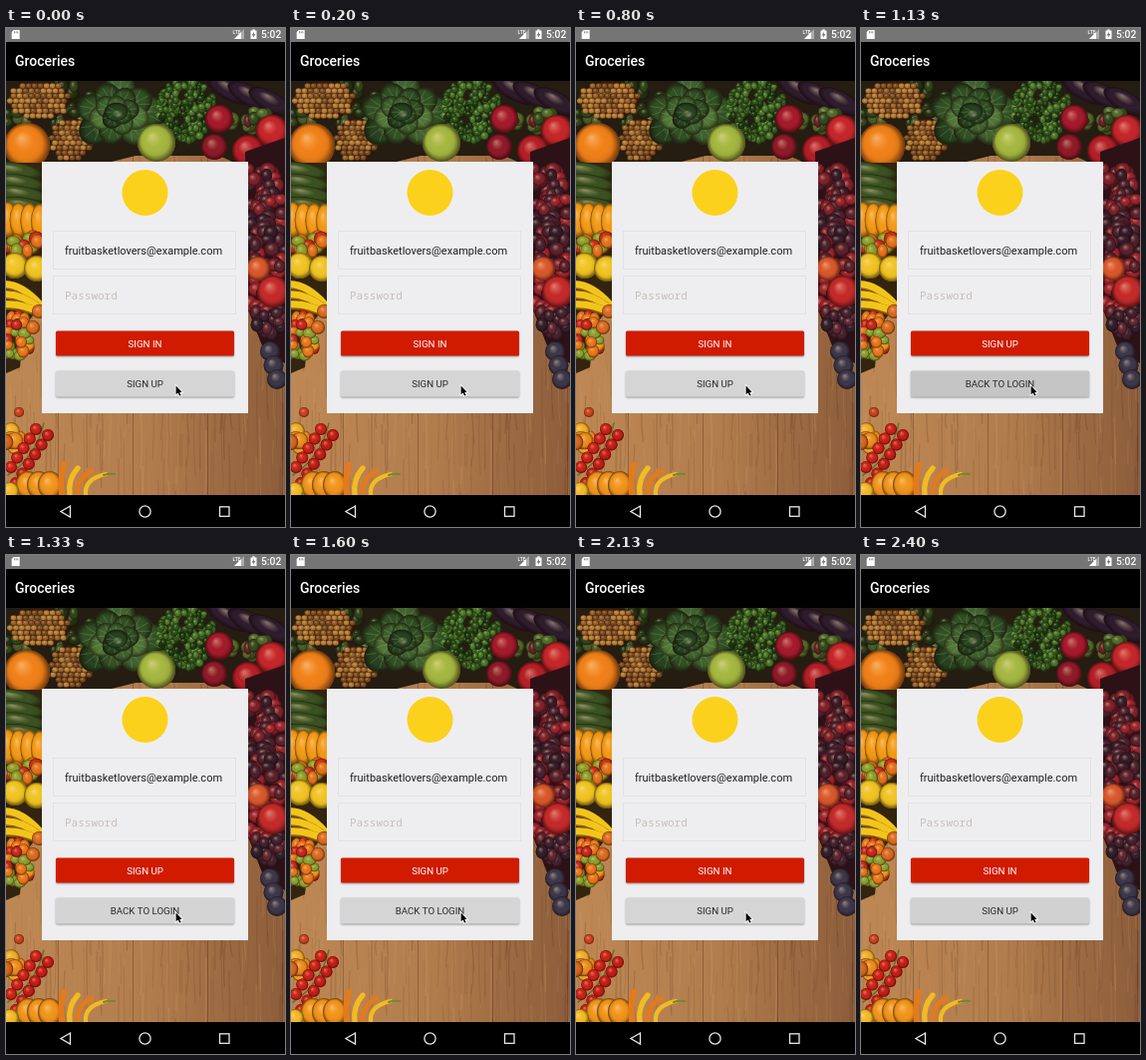
Recreate the animation shown at these times as an HTML page with a canvas. Size 280 by 500 pixels, loop 2470 ms.

```html
<!DOCTYPE html>
<html lang="en">
<head>
<meta charset="utf-8">
<title>Groceries</title>
<style>
html, body { margin: 0; width: 100%; height: 100%; overflow: hidden; background: #000; }
canvas { display: block; width: 280px; height: 500px; }
</style>
</head>
<body>
<canvas id="stage"></canvas>
<script>
const W = 280, H = 500, LOOP = 2470, TAU = Math.PI * 2;
const SANS = 'Roboto, sans-serif';
const dpr = window.devicePixelRatio || 1;

function sizeCanvas(canvas) {
  canvas.width = W * dpr;
  canvas.height = H * dpr;
  const c = canvas.getContext('2d');
  c.scale(dpr, dpr);
  return c;
}

const ctx = sizeCanvas(document.getElementById('stage'));
const backdrop = document.createElement('canvas');
const bg = sizeCanvas(backdrop);

let seed = 11;
function rand(a = 0, b = 1) {
  seed = (seed * 16807) % 2147483647;
  return a + (b - a) * seed / 2147483647;
}
const pick = list => list[Math.floor(rand(0, list.length))];
const mix = (a, b, k) => a + (b - a) * k;
const clamp = v => Math.max(0, Math.min(1, v));

function rect(c, color, x, y, w, h) {
  c.fillStyle = color;
  c.fillRect(x, y, w, h);
}

function polygon(c, color, ...p) {
  c.beginPath();
  for (let i = 0; i < p.length; i += 2) c.lineTo(p[i], p[i + 1]);
  c.closePath();
  c.fillStyle = color;
  c.fill();
}

function ring(c, x, y, r) {
  c.beginPath();
  c.arc(x, y, r, 0, TAU);
}

function curve(color, width, x1, y1, cx, cy, x2, y2) {
  bg.beginPath();
  bg.moveTo(x1, y1);
  bg.quadraticCurveTo(cx, cy, x2, y2);
  bg.strokeStyle = color;
  bg.lineWidth = width;
  bg.lineCap = 'round';
  bg.stroke();
}

function label(c, text, x, y, font, color, align = 'left') {
  c.font = font;
  c.fillStyle = color;
  c.textAlign = align;
  c.fillText(text, x, y);
}

// Rounded fruit with a soft highlight and a dark rim.
const shade = bg.createRadialGradient(-.25, -.35, .05, 0, 0, 1);
shade.addColorStop(0, 'rgba(255,240,210,.38)');
shade.addColorStop(.45, 'rgba(255,200,120,0)');
shade.addColorStop(.75, 'rgba(30,8,0,.08)');
shade.addColorStop(1, 'rgba(20,5,0,.6)');

function oval(color, x, y, rx, ry = rx, turn = 0) {
  bg.save();
  bg.translate(x, y);
  bg.rotate(turn);
  bg.scale(rx, ry);
  ring(bg, 0, 0, 1);
  bg.fillStyle = color;
  bg.fill();
  bg.fillStyle = shade;
  bg.fill();
  bg.restore();
}

function scatter(colors, x, y, rx, ry, count, size) {
  for (let i = 0; i < count; i++) {
    const a = rand(0, TAU), d = Math.sqrt(rand());
    oval(pick(colors), x + Math.cos(a) * d * rx, y + Math.sin(a) * d * ry,
      size * rand(.7, 1.2), size * rand(.7, 1.2));
  }
}

// Evenly spaced fruit from one point to another.
function row(color, count, x1, y1, x2, y2, rx, ry = rx, turn = 0) {
  for (let i = 0; i < count; i++) {
    const k = i / (count - 1);
    oval(color, mix(x1, x2, k), mix(y1, y2, k), rx, ry, turn);
  }
}

function pineapple(x, y, rx, ry) {
  oval('#4a2a10', x, y, rx, ry);
  for (let v = -ry, odd = 0; v < ry; v += 5, odd = 3 - odd) {
    const half = rx * Math.sqrt(1 - (v / ry) ** 2);
    for (let u = -half + odd; u < half; u += 6) {
      oval(pick(['#96602a', '#7a4a20', '#b37a35']), x + u, y + v, 3.2, 2.8);
    }
  }
}

function cabbage(x, y, r) {
  for (let i = 0; i < 18; i++) {
    const a = i * 2.4, d = r * (1 - i / 18) * .75, size = r * mix(.5, .28, i / 18);
    const lx = x + Math.cos(a) * d, ly = y + Math.sin(a) * d * .8;
    oval(pick(['#2e4f25', '#3d6130', '#234020', '#4f7638']), lx, ly, size, size * .8, a);
    for (let vein = -.7; vein <= .7; vein += .7) {
      curve('rgba(150,185,110,.4)', .7, x, y, lx, ly,
        lx + Math.cos(a + vein) * size * .8, ly + Math.sin(a + vein) * size * .7);
    }
  }
}

function paintWood() {
  const g = bg.createLinearGradient(0, 0, W, 0);
  g.addColorStop(0, '#bd8854');
  g.addColorStop(.5, '#b27d4d');
  g.addColorStop(1, '#8c5d3b');
  rect(bg, g, 0, 53, W, 415);
  for (let i = 0; i < 420; i++) {
    const x = rand(0, W), y = rand(90, 460), length = rand(15, 90);
    const tone = rand() < .55 ? '65,30,10' : '225,175,120';
    curve(`rgba(${tone},${rand(.05, .2)})`, rand(.5, 1.8),
      x, y, x + rand(-3, 3), y + length / 2, x + rand(-2, 2), y + length);
  }
  for (let x = 52; x < W; x += 75) rect(bg, 'rgba(65,28,8,.3)', x, 53, 1, 415);
}

function paintTop() {
  polygon(bg, '#251c12', 0, 53, W, 53, W, 150, 236, 138, 214, 128, 130, 128, 90, 138, 0, 140);
  scatter(['#2c4219', '#1d2e12', '#45592a'], 50, 90, 50, 38, 60, 6);
  pineapple(34, 72, 30, 19);
  pineapple(66, 112, 20, 22);
  cabbage(112, 84, 40);
  scatter(['#2b541b', '#1a3811', '#47762a', '#356322'], 181, 82, 29, 31, 190, 3.5);
  row('#2b1a2c', 3, 224, 62, 266, 74, 25, 10, .5);
  scatter(['#4d6a2a', '#30471c', '#6b1d28'], 246, 92, 24, 10, 18, 6);
  oval('#f08018', 21, 118, 23);
  oval('#a3b840', 151, 115, 19);
  oval('#a3182b', 214, 91, 14);
  oval('#8c1828', 209, 119, 13);
  oval('#b31d27', 243, 123, 16);
  oval('#c4242a', 267, 103, 16);
}

function paintLeft() {
  polygon(bg, '#33240f', 0, 135, 37, 135, 37, 275, 18, 300, 14, 340, 0, 346);
  row('#385020', 4, 10, 143, 18, 178, 28, 8, .15);
  row('#f29a16', 4, 2, 192, 34, 194, 9, 18);
  scatter(['#c92a14', '#e2701a', '#8d9d28'], 20, 217, 20, 9, 16, 7);
  row('#efc421', 2, 9, 238, 31, 241, 13);
  for (let i = 0; i < 3; i++) {
    curve('#8a5a08', 9, -4, 258 + i * 10, 14, 256 + i * 10, 34, 278 + i * 4);
    curve('#f2c51c', 7, -4, 257 + i * 10, 14, 255 + i * 10, 34, 277 + i * 4);
  }
  scatter(['#e8761a', '#c5261a', '#ee9820', '#87a030'], 10, 311, 14, 26, 34, 6);
  row('#d86a20', 2, 33, 284, 27, 300, 7);
  oval('#c8401f', 13, 385, 5);
}

function paintRight() {
  polygon(bg, '#2c1216', 240, 124, W, 110, W, 336, 260, 326, 242, 280);
  for (let y = 145; y < 300; y += 11) {
    scatter(['#571f2b', '#341a28', '#7c1f2a', '#98222c', '#47202f'], 261, y, 20, 8, 7, 7);
  }
  oval('#d8562c', 253, 241, 12);
  oval('#c3282a', 268, 264, 16);
  scatter(['#40202f', '#5c2535', '#2d1d2b'], 264, 296, 17, 13, 22, 6);
  row('#39354a', 3, 265, 324, 272, 352, 10);
}

function paintBottomLeft() {
  scatter(['#e98c1c', '#d6651a', '#efac28'], 6, 412, 9, 12, 10, 8);
  curve('#5d7430', 1.5, 38, 396, 30, 430, 2, 448);
  row('#cb2017', 5, 30, 402, 5, 440, 6);
  row('#c21b15', 6, 42, 408, 10, 456, 6);
  row('#f0941a', 3, 22, 458, 44, 458, 12, 14);
  oval('#f3b923', 4, 464, 9);
  for (let i = 0; i < 4; i++) {
    const x = 56 + i * 8, tip = 58 + i * 14;
    curve(i % 2 ? '#f2bb22' : '#e37a1c', 6 - i * .6, x, 468, x - 2, 452, tip, 438 + i * 3);
  }
  curve('#6c8a30', 2, 98, 448, 103, 446, 109, 447);
}

function paintStatusBar() {
  rect(bg, '#757575', 0, 0, W, 14);
  rect(bg, '#000', 0, 14, W, 39);
  polygon(bg, '#fff', 5.7, 4, 7.7, 2, 13.7, 2, 13.7, 11, 5.7, 11);
  for (let x = 8; x < 12; x += 1.7) rect(bg, '#757575', x, 3.3, .8, 2);
  label(bg, 'LTE', 227.5, 5.5, '500 5px ' + SANS, '#fff');
  polygon(bg, 'rgba(255,255,255,.4)', 229, 11, 239, 1, 239, 11);
  polygon(bg, '#fff', 229, 11, 236, 4, 236, 11);
  rect(bg, '#fff', 245.5, 2.5, 6, 8.5);
  rect(bg, '#fff', 247.3, 1.3, 2.4, 1.5);
  polygon(bg, '#757575', 249, 3.5, 246.6, 7.4, 248.3, 7.4, 248, 10, 250.4, 6, 248.8, 6);
  label(bg, '5:02', 256, 10, '500 10.3px ' + SANS, '#fff');
  label(bg, 'Groceries', 9, 38, '500 14px ' + SANS, '#fff');
}

function paintNavBar() {
  rect(bg, '#000', 0, 468, W, 32);
  bg.strokeStyle = '#e8e8e8';
  bg.lineWidth = 1.3;
  bg.beginPath();
  bg.moveTo(64.5, 479);
  bg.lineTo(55, 484.5);
  bg.lineTo(64.5, 490);
  bg.closePath();
  bg.stroke();
  ring(bg, 139.5, 484.5, 5.6);
  bg.stroke();
  bg.strokeRect(214.5, 479.8, 9.5, 9.5);
}

function field(text, y, baseline, font, color) {
  bg.strokeStyle = '#e3e0e2';
  bg.lineWidth = 1;
  bg.strokeRect(47.5, y, 183, 38);
  label(bg, text, 59, baseline, font, color);
}

function paintCard() {
  rect(bg, '#eeeef0', 36, 134, 207, 252);
  ring(bg, 139.5, 165, 23);
  bg.fillStyle = '#fbd11b';
  bg.fill();
  field('fruitbasketlovers@example.com', 203.5, 227, '11px ' + SANS, '#1e1e1e');
  field('Password', 248.5, 272.3, '11px "Noto Sans Mono", monospace', '#c9bfba');
}

function button(text, y, h, fill, ink) {
  ctx.save();
  ctx.shadowColor = 'rgba(0,0,0,.36)';
  ctx.shadowBlur = 2 * dpr;
  ctx.shadowOffsetY = dpr;
  ctx.fillStyle = fill;
  ctx.beginPath();
  ctx.roundRect(50, y, 179, h, 1.5);
  ctx.fill();
  ctx.restore();
  label(ctx, text, 139.5, y + h / 2 + 3.4, '9.7px ' + SANS, ink, 'center');
}

function cursor(x, y) {
  ctx.save();
  ctx.translate(x, y);
  ctx.lineWidth = 1.6;
  ctx.strokeStyle = '#fff';
  polygon(ctx, '#000', 0, 0, 0, 8.6, 2, 6.8, 3.5, 10, 5, 9.3, 3.6, 6.3, 6, 6.2);
  ctx.stroke();
  ctx.fill();
  ctx.restore();
}

// Rises after a press, then fades once the click lands.
function ripple(t, down, up) {
  return clamp((t - down) / 130) * (1 - clamp((t - up - 60) / 220));
}

const FIRST = 1070, SECOND = 1670;

function draw(t) {
  const signingUp = t >= FIRST && t < SECOND;
  const press = Math.max(ripple(t, 940, FIRST), ripple(t, 1605, SECOND), .5 * ripple(t, 2330, LOOP));
  const grey = Math.round(214 - 16 * press);
  ctx.drawImage(backdrop, 0, 0, W, H);
  button(signingUp ? 'SIGN UP' : 'SIGN IN', 303.6, 25, '#d01b00', '#fff');
  button(signingUp ? 'BACK TO LOGIN' : 'SIGN UP', 343.4, 26, `rgb(${grey},${grey - 1},${grey})`, '#282828');
  cursor(170.6, 358.6);
}

[paintWood, paintTop, paintLeft, paintRight, paintBottomLeft,
  paintStatusBar, paintNavBar, paintCard].forEach(paint => paint());

const start = performance.now();
function tick() {
  draw((performance.now() - start) % LOOP);
  requestAnimationFrame(tick);
}
tick();
</script>
</body>
</html>
```
